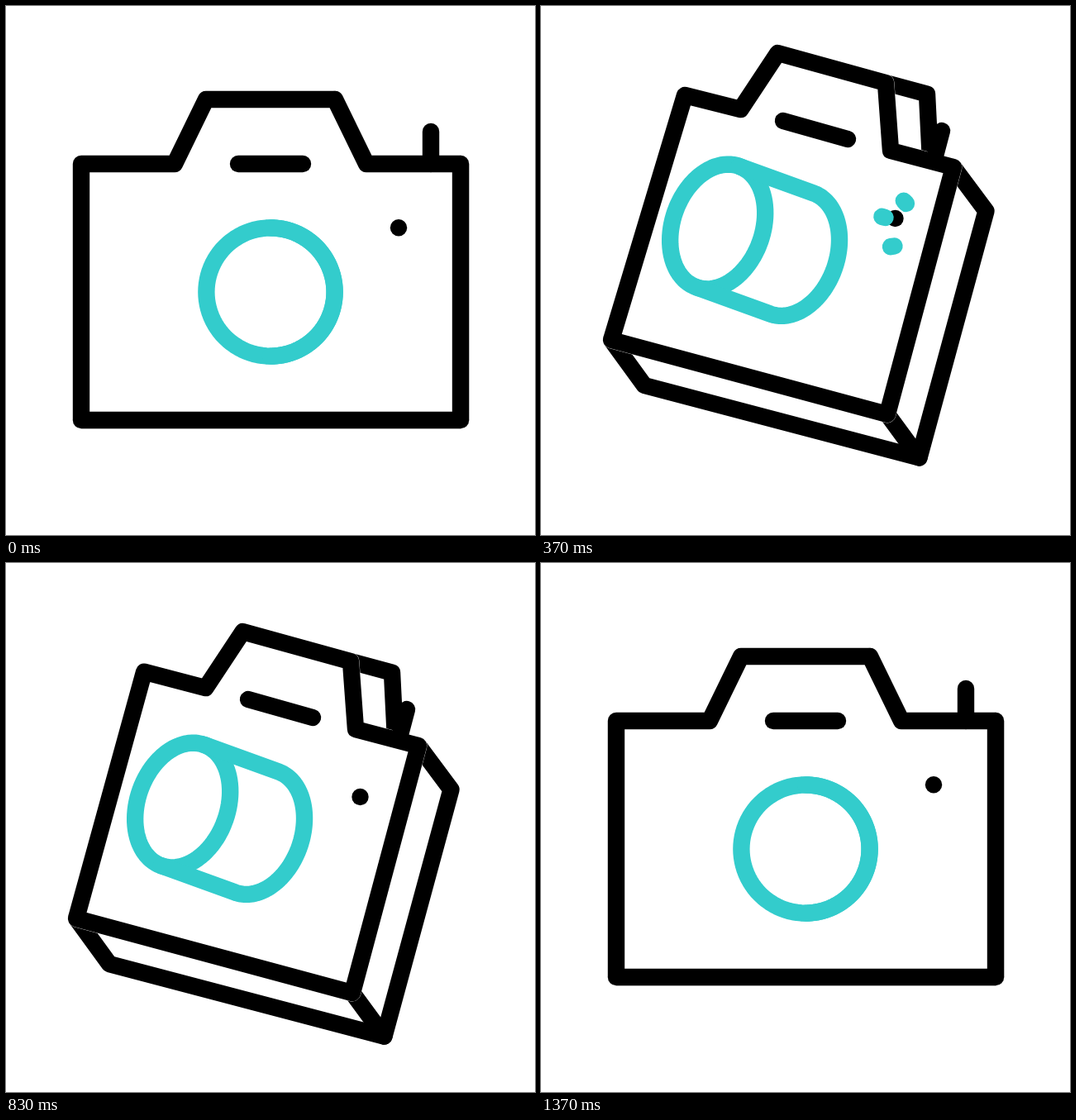
Recreate the animation shown at these times as an HTML page with a canvas. Size 640x640 px, loop 2 s.

```html
<!DOCTYPE html>
<html lang="en">
<head>
<meta charset="utf-8">
<title>Camera</title>
<style>
html, body { margin: 0; width: 100%; height: 100%; overflow: hidden; background: #fff; }
canvas { display: block; width: 640px; height: 640px; }
</style>
</head>
<body>
<canvas id="stage" width="640" height="640"></canvas>
<script>
const ctx = document.getElementById('stage').getContext('2d');
const LOOP = 2000, FRAME = 100 / 3;
const BLACK = '#000', CYAN = '#33cccc', WIDTH = 20.4;

// Each pose point: [flat x, flat y, tilted x, tilted y]
const POSE = {
  topLeft: [91, 191, 174, 108],
  notchLeft: [204, 191, 241.5, 125],
  peakLeft: [242, 113, 286.5, 57],
  peakRight: [398, 113, 417, 93],
  notchRight: [436, 191, 423, 175],
  topRight: [550, 191, 499, 195],
  bottomRight: [550, 501, 419, 494],
  bottomLeft: [91, 501, 85, 404],
  backPeak: [398, 113, 467, 106.5],
  backNotch: [436, 191, 471, 187],
  backTop: [550, 191, 538.5, 248],
  backRight: [550, 501, 457.5, 546.5],
  backLeft: [91, 501, 125, 459],
  buttonTop: [514, 152, 485, 151],
  buttonEnd: [514, 191, 475.5, 187],
  dashStart: [281, 191, 293, 139],
  dashEnd: [359, 191, 371, 161],
  dot: [475, 268.3, 428.5, 257],
  lensFront: [320, 346, 213.7, 267],
  lensBack: [320, 346, 303.5, 299.5]
};
const FRONT = ['topLeft', 'notchLeft', 'peakLeft', 'peakRight', 'notchRight',
  'topRight', 'bottomRight', 'bottomLeft'];

// Light rays: start x, start y, direction in degrees, length
const RAYS = [[442, 239, 225.5, 165], [416.5, 256, 196, 152], [427.5, 290.5, 171.2, 163]];

const clamp = v => Math.min(1, Math.max(0, v));
const lerp = (a, b, t) => a + (b - a) * t;
const span = (f, from, to) => clamp((f - from) / (to - from));
const ease = (f, from, to) => {
  const t = span(f, from, to);
  return t * t * (3 - 2 * t);
};

function trace(points) {
  ctx.beginPath();
  points.forEach(([x, y]) => ctx.lineTo(x, y));
}

function line(points, color = BLACK) {
  trace(points);
  ctx.strokeStyle = color;
  ctx.lineWidth = WIDTH;
  ctx.stroke();
}

function drawBody(p) {
  line([p.topRight, p.backTop, p.backRight, p.backLeft, p.bottomLeft]);
  line([p.bottomRight, p.backRight]);
  line([p.peakRight, p.backPeak, p.backNotch]);

  // A slightly wider white outline leaves a hairline seam around the front
  trace(FRONT.map(name => p[name]));
  ctx.closePath();
  ctx.fillStyle = ctx.strokeStyle = '#fff';
  ctx.fill();
  ctx.lineWidth = WIDTH + 0.5;
  ctx.stroke();
  ctx.strokeStyle = BLACK;
  ctx.lineWidth = WIDTH;
  ctx.stroke();

  line([p.buttonTop, p.buttonEnd]);
  line([p.dashStart, p.dashEnd]);
  ctx.beginPath();
  ctx.arc(...p.dot, 10.2, 0, 2 * Math.PI);
  ctx.fillStyle = BLACK;
  ctx.fill();
}

function drawLens(front, back, tilt) {
  const radius = 77.6, minor = 54.5, turn = 19.5 * Math.PI / 180;
  const cos = Math.cos(turn), sin = Math.sin(turn);
  const ux = lerp(radius, minor * cos, tilt), uy = lerp(0, minor * sin, tilt);
  const vx = lerp(0, -radius * sin, tilt), vy = lerp(radius, radius * cos, tilt);
  const arc = ([x, y], from, to) => Array.from({ length: 97 }, (_, i) => {
    const a = lerp(from, to, i / 96), c = Math.cos(a), s = Math.sin(a);
    return [x + ux * c + vx * s, y + uy * c + vy * s];
  });
  line(arc(front, 0, 2 * Math.PI), CYAN);
  line([[front[0] - vx, front[1] - vy],
    ...arc(back, -Math.PI / 2, Math.PI / 2),
    [front[0] + vx, front[1] + vy]], CYAN);
}

function drawRays(f) {
  const head = ease(f, 10, 20), tail = ease(f, 13, 23);
  if (head <= tail) return;
  for (const [x, y, degrees, length] of RAYS) {
    const a = degrees * Math.PI / 180;
    const at = t => [x + Math.cos(a) * length * t, y + Math.sin(a) * length * t];
    line([at(tail), at(head)], CYAN);
  }
}

function draw(f) {
  const tilt = ease(f, 0, 11) - ease(f, 30, 41);
  const drop = 48.3 * (ease(f, 11, 20.5) - ease(f, 20.5, 30));
  const drift = span(f, 11, 30);
  const p = {};
  for (const name in POSE) {
    const [x0, y0, x1, y1] = POSE[name];
    p[name] = [lerp(x0, x1, tilt), lerp(y0, y1, tilt)];
  }
  p.topLeft[0] -= 9.4 * drift * tilt;
  p.topLeft[1] -= 3.2 * drift * tilt;

  ctx.fillStyle = '#fff';
  ctx.fillRect(0, 0, 640, 640);
  ctx.save();
  ctx.translate(0, drop);
  ctx.lineCap = ctx.lineJoin = 'round';
  drawBody(p);
  drawLens(p.lensFront, p.lensBack, tilt);
  drawRays(f);
  ctx.restore();
}

const start = performance.now();
function tick() {
  const t = (performance.now() - start) % LOOP;
  // 30 steps per second, with step times rounded to 10 ms
  draw(Math.floor((Math.floor(t / 10) * 10 + 5) / FRAME));
  requestAnimationFrame(tick);
}
tick();
</script>
</body>
</html>
```
